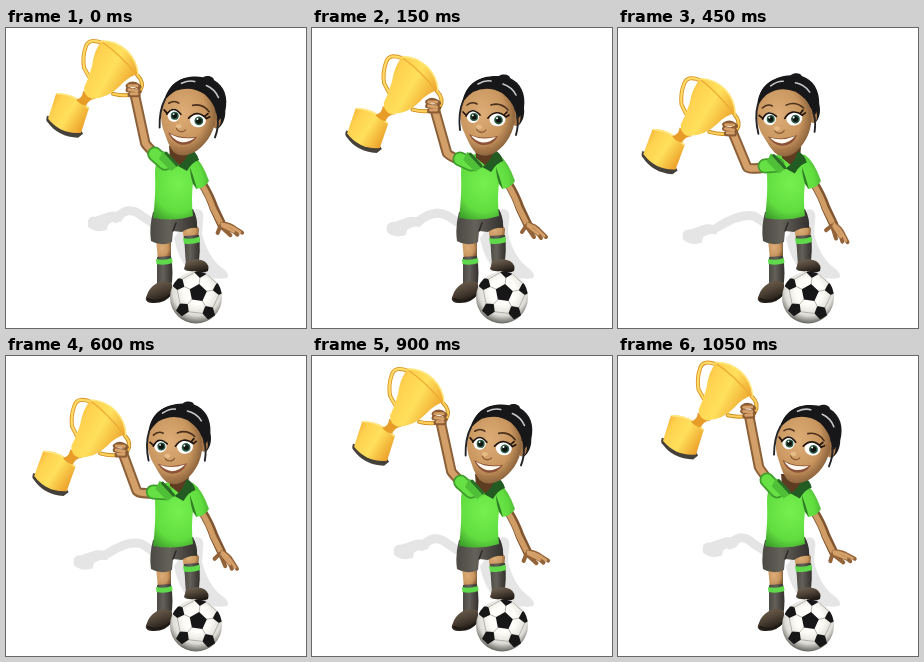
An HTML page for the animation above (1.65 s loop, 300x300 px).

```html
<!DOCTYPE html>
<html lang="en">
<head>
<meta charset="utf-8">
<title>Trophy lift</title>
<style>
html, body { margin: 0; width: 100%; height: 100%; overflow: hidden; background: #fff; }
svg { display: block; width: 100vw; height: 100vh; }
.line { fill: none; stroke-linecap: round; stroke-linejoin: round; }
</style>
</head>
<body>
<svg viewBox="0 0 300 300">
<defs>
  <linearGradient id="gold" y2=".6">
    <stop offset="0" stop-color="#f2a02a"/><stop offset=".3" stop-color="#ffd250"/>
    <stop offset=".6" stop-color="#ffe05c"/><stop offset="1" stop-color="#eda32c"/>
  </linearGradient>
  <radialGradient id="skin" cx=".4" cy=".4" r=".68">
    <stop offset="0" stop-color="#deae78"/><stop offset=".6" stop-color="#c9965f"/><stop offset="1" stop-color="#75502f"/>
  </radialGradient>
  <radialGradient id="shirt" cx=".45" cy=".45" r=".72">
    <stop offset="0" stop-color="#76f050"/><stop offset=".6" stop-color="#62dd40"/><stop offset="1" stop-color="#318a24"/>
  </radialGradient>
  <linearGradient id="cloth">
    <stop offset="0" stop-color="#4b4943"/><stop offset=".4" stop-color="#64605a"/><stop offset="1" stop-color="#33312d"/>
  </linearGradient>
  <linearGradient id="shoe" x2=".4" y2="1">
    <stop offset="0" stop-color="#75685a"/><stop offset=".5" stop-color="#524639"/><stop offset="1" stop-color="#221c17"/>
  </linearGradient>
  <radialGradient id="ballShade" cx=".52" cy=".38" r=".62">
    <stop offset=".4" stop-color="#fffefa"/><stop offset=".75" stop-color="#dedcd6"/><stop offset="1" stop-color="#66645f"/>
  </radialGradient>
  <clipPath id="ballClip"><circle cx="190" cy="269.500" r="26"/></clipPath>
  <g id="panel">
    <path d="M15 0 L20 -6 L28 -4 V4 L20 6Z" fill="#171717"/>
    <path class="line" d="M8 0 H15 M20 6 L11.900 17.200" stroke="#aaa8a2" stroke-width=".8"/>
  </g>
</defs>

<g fill="#e5e5e5">
  <path d="M168 210 L190 181 Q199 181 197 192 L196 206 Q202 229 215 239 Q225 246 221 250 Q208 253 184 243 Q172 232 168 210Z"/>
  <path id="armShadow" class="line" stroke="#e5e5e5" stroke-width="9"/>
  <path id="cupShadow" d="M75 204 Q73 193 82 194 L97 189 Q107 188 112 193 L108 199 Q101 197 95 202 L94 207 Q83 211 75 204Z"/>
</g>

<g id="raisedArm" class="line">
  <path id="armDark" stroke="#8c6038" stroke-width="10.500"/>
  <path id="armLight" stroke="#d3a069" stroke-width="6.500"/>
</g>

<!-- standing leg -->
<path d="M150 211 H165 L165 232 H152Z" fill="url(#skin)"/>
<path d="M151 229 L165 228 Q168 247 165 259 L151 260Z" fill="url(#cloth)"/>
<path d="M150 231 Q158 233 166 230 L166.500 235 Q158 238 150.500 236Z" fill="#5fd94c"/>
<path d="M151 255 Q160 250 166 256 L166 266 Q159 276 146 275 Q137 274 141 267 Q143 260 151 255Z" fill="url(#shoe)"/>
<path class="line" d="M142 271 Q152 276 164 267" stroke="#201a16" stroke-width="2"/>

<!-- ball -->
<circle cx="190" cy="269.500" r="26" fill="url(#ballShade)"/>
<g clip-path="url(#ballClip)">
  <g transform="translate(192 265) rotate(-11)">
    <use href="#panel"/>
    <use href="#panel" transform="rotate(72)"/>
    <use href="#panel" transform="rotate(144)"/>
    <use href="#panel" transform="rotate(216)"/>
    <use href="#panel" transform="rotate(288)"/>
    <path d="M9 0 L2.800 8.600 L-7.300 5.300 V-5.300 L2.800 -8.600Z" fill="#171717"/>
  </g>
</g>

<!-- raised foot -->
<path d="M176 197 Q190 193 193 201 L192 212 H178Z" fill="url(#skin)"/>
<path d="M178 208 L193 207 Q195 224 192 237 L180 238Z" fill="url(#cloth)"/>
<path d="M177 210 Q185 212 193.500 208.500 L194 214 Q186 217 178 215.500Z" fill="#5fd94c"/>
<path d="M180 234 Q189 229 198 233 Q204 237 202 243 Q196 246 189 243 Q181 244 178 241Z" fill="url(#shoe)"/>

<!-- shorts and resting arm -->
<path d="M147 184 L187 181 Q192 191 191 200 Q184 199 176 204 L167 203 L166 214 Q155 219 145 213 Q143 199 147 184Z" fill="url(#cloth)"/>
<path class="line" d="M167 203 L170 195" stroke="#2b2925" stroke-width="1.500"/>
<g class="line">
  <path d="M196 155 Q204 168 208 180 L216 197" stroke="#80552f" stroke-width="9"/>
  <path d="M195 155 Q203 168 207 180 L215.500 197" stroke="#d09c65" stroke-width="5.500"/>
</g>
<g id="restingHand" class="line">
  <path d="M216 196 Q223 197 228 203 L234 209 M216 198 L227 207 L229 210 M215 199 L222 209 M214 198 L210 204" stroke="#936339" stroke-width="4"/>
  <path d="M216 196 Q222 198 227 203 L232 208 M216 198 L226 206" stroke="#d5a069" stroke-width="2.800"/>
</g>

<!-- shirt -->
<path d="M152 130 Q165 123 187 127 Q196 133 203 153 Q199 160 190 161 L187 155 Q185 171 187 188 Q168 194 147 190 Q150 166 149 146 Q149 136 152 130Z" fill="url(#shirt)"/>
<path d="M187 156 Q184 146 184 139 Q188 150 191 161Z" fill="#2f7d24"/>
<path id="sleeve" class="line" stroke="#3f9c2c" stroke-width="15"/>
<path id="sleeveLight" class="line" stroke="#66e045" stroke-width="11.500"/>
<path d="M163 118 H183 L182 132 L174 138 L164 130Z" fill="#5e3c22"/>
<g id="collar">
  <path d="M157 123 Q162 124 172 138 L165 143 L153 131Z" fill="#4fbf38"/>
  <path d="M184 121 Q191 124 193 132 Q186 134 181 143 L172 138 Q181 132 184 121Z" fill="#235c22"/>
  <path d="M160 125 L171 137" class="line" stroke="#2a6b25" stroke-width="3"/>
</g>

<g id="head">
  <path d="M151 73 C152 55 168 47 186 48 C190 45 197 47 197 50 C208 55 213 66 211 80 C212 88 209 95 205 98 Q201 92 199 82Z" fill="#19191b"/>
  <ellipse cx="203" cy="90" rx="4.500" ry="8" fill="#a87748"/>
  <path d="M148 80 C150 66 160 57 176 57 C192 58 202 70 202 87 C202 104 193 117 183 124 Q172 131 163 125 C157 119 154 110 150 102 Q146 91 148 80Z" fill="url(#skin)"/>
  <path d="M149 76 C151 60 162 50 176 49 C194 48 210 58 210 74 Q210 86 204 92 C203 80 198 72 189 65 Q175 57 160 64 Q153 69 149 76Z" fill="#171719"/>
  <path d="M165 56 Q172 52 178 53 M190 56 Q199 59 203 67" class="line" stroke="#c9c9cc" stroke-width="1.600"/>
  <path d="M150 73 Q145 85 147 102 M204 88 Q206 96 203 107" class="line" stroke="#242326" stroke-width="1.900"/>
  <path d="M154 77 Q159 73 164 76 M178 77 Q188 74 195 82" class="line" stroke="#4a301d" stroke-width="1.600"/>

  <g id="openEyes">
    <ellipse cx="160" cy="88.500" rx="6.200" ry="6.500" fill="#fff"/>
    <ellipse cx="184.500" cy="91.500" rx="8" ry="6.800" fill="#fff"/>
    <g fill="#2b5a45"><circle cx="161" cy="89" r="4"/><circle cx="185.500" cy="92" r="4.400"/></g>
    <g fill="#101411"><circle cx="161" cy="89" r="2.600"/><circle cx="185.500" cy="92" r="2.800"/></g>
    <g fill="#fff"><circle cx="159.800" cy="87.400" r=".9"/><circle cx="184" cy="90.200" r="1"/></g>
    <path d="M153 88 Q159 78 167 87 M175 90 Q183 80 193 89 L196 87 M191 87 L194 84 M153 87 L150 84" class="line" stroke="#21150f" stroke-width="1.700"/>
  </g>
  <g id="closedEyes" class="line">
    <ellipse cx="160" cy="88" rx="7" ry="6.500" fill="#cf9c65"/>
    <ellipse cx="184.500" cy="90" rx="8.500" ry="6.500" fill="#c89560"/>
    <path d="M152 90 Q158 96 167 92 M176 94 Q184 98 193 92 M152 91 L149 93 M192 93 L196 94" stroke="#2b1a11" stroke-width="1.700"/>
  </g>

  <path d="M164 99 Q163 103 167 104 Q171 105 173 102" class="line" stroke="#8d6038" stroke-width="1.300"/>
  <ellipse cx="166" cy="99" rx="3" ry="2.200" fill="#e6bb88"/>
  <path d="M156 106 Q168 112 185 108 Q180 118 169 117 Q160 115 156 106Z" fill="#8b5138"/>
  <path d="M158 107.500 Q169 112.500 183 109 Q177 115 169 114.500 Q162 113 158 107.500Z" fill="#fffaf1"/>
  <path d="M164 121 Q170 123 176 120" class="line" stroke="#a97648" stroke-width="1.500"/>
</g>

<g id="trophy">
  <g class="line">
    <path d="M96 15 Q83 10 80 18 Q76 29 78 40 L83 49" stroke="#dc9424" stroke-width="4"/>
    <path d="M96 15 Q83 10 80 18 Q76 29 78 40 L83 49" stroke="#ffdc68" stroke-width="2.200"/>
    <path d="M131 47 Q139 55 134 63 Q124 70 107 66" stroke="#c98a20" stroke-width="4"/>
    <path d="M131 47 Q139 55 134 63 Q124 70 107 66" stroke="#ffd05a" stroke-width="2.200"/>
  </g>
  <path d="M41 88 Q39 93 42 95 Q52 109 72 110 L77 106 L72 98Z" fill="#45403a"/>
  <path d="M50 66 Q66 63 83 80 L75 105 Q55 107 42 91Z" fill="url(#gold)"/>
  <path d="M51 66 Q68 66 82 80" class="line" stroke="#ffe784" stroke-width="1.500"/>
  <path d="M77 63 Q77 70 70 72 Q74 77 80 78 Q83 71 90 71Z" fill="#e79c28"/>
  <path d="M96 13 Q110 13 121 23 Q131 33 132 46 Q122 49 114 58 Q103 70 86 71 Q78 69 78 60 Q83 50 86 38 Q88 22 96 13Z" fill="url(#gold)"/>
  <path d="M96 13 Q110 13 121 23 Q131 33 132 46" class="line" stroke="#ffe780" stroke-width="1.600"/>
  <path d="M97 15 Q112 25 130 46" class="line" stroke="#edaa32" stroke-width="1.200"/>
  <g class="line">
    <path d="M122 58 Q127 54 133 59 M122 62 L133 64 M124 67 L132 67" stroke="#8b5c33" stroke-width="5"/>
    <path d="M123 58 L131 58 M123 62 L131 63 M125 66 L131 66" stroke="#d5a069" stroke-width="3"/>
  </g>
</g>
</svg>

<script>
const STEP = 150, LOOP = 1650, REST_START = 1050, BLINK_STEP = 6;
const $ = id => document.getElementById(id);
const setPath = (id, d) => $(id).setAttribute("d", d);
const transform = (id, value) => $(id).setAttribute("transform", value);

function pose(step) {
  // 0 is the trophy held highest, 1 the lowest point of the dip.
  const dip = (1 - Math.cos(step * Math.PI / 4)) / 2;
  const offset = dip - .5;
  const drop = dip - .15;
  const hand = [131 - 16.5 * dip, 59 + 45 * dip];
  const elbow = [141 - 12 * dip, 111 + 28 * dip];
  const shoulder = [159, 135 + 2 * dip];
  const cuff = [149 - 2 * dip, 124 + 14 * dip];

  const arm = `M${hand} L${elbow} Q${elbow[0] + 2} ${elbow[1] + 4} ${shoulder}`;
  setPath("armDark", arm);
  setPath("armLight", arm);
  setPath("sleeve", `M${cuff} L${shoulder}`);
  setPath("sleeveLight", `M${cuff} L${shoulder}`);
  setPath("armShadow", `M${106 - 12 * offset} ${194 + 10 * offset} Q122 ${180 + 10 * offset} 136 188 L150 197`);

  transform("trophy", `translate(${-16.5 * drop} ${45 * drop}) rotate(${3 * drop} 113 30)`);
  transform("cupShadow", `translate(${-20 * offset} ${15 * offset})`);
  transform("head", `translate(${1 - 10 * offset} 0) rotate(${-14 * offset} 176 125)`);
  transform("collar", `translate(${-5 * drop} ${3 * drop})`);
  transform("restingHand", `rotate(${35 * offset} 215 197)`);

  const blink = step === BLINK_STEP;
  $("openEyes").style.display = blink ? "none" : "";
  $("closedEyes").style.display = blink ? "" : "none";
}

const start = performance.now();
function frame() {
  const t = (performance.now() - start) % LOOP;
  pose(t < REST_START ? Math.floor(t / STEP) + 1 : 0);
  requestAnimationFrame(frame);
}
frame();
</script>
</body>
</html>
```
